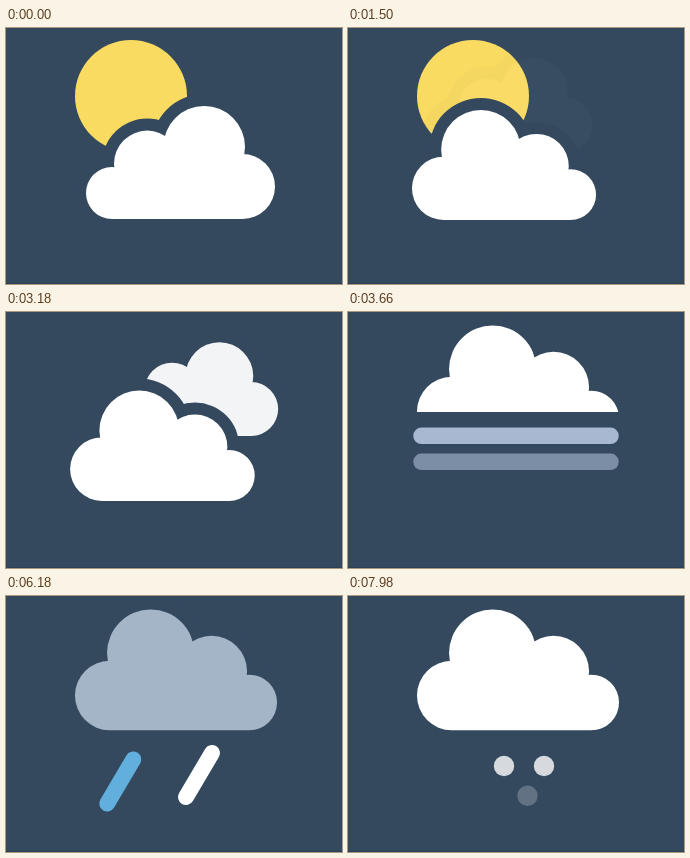
Write an HTML page with a canvas that moves like this. It is 336 px wide and 256 px high and loops after 8000 ms.

```html
<!DOCTYPE html>
<html lang="en">
<head>
<meta charset="utf-8">
<title>Weather icons</title>
<style>
html, body { margin: 0; width: 100%; height: 100%; overflow: hidden; background: #34495e; }
canvas { display: block; width: 336px; height: 256px; }
</style>
</head>
<body>
<canvas id="stage" width="336" height="256"></canvas>
<script>
const W = 336, H = 256, LOOP = 8000, TAU = Math.PI * 2;
const BG = '#34495e', SUN = '#f9db62', BLUE = '#62aedd', FOG = '#a8b8d0';
const WHITE = [255, 255, 255], GREY = [165, 181, 200];
const GAP = 12;

const stage = document.getElementById('stage').getContext('2d');
const layer = document.createElement('canvas');
layer.width = W;
layer.height = H;
const buf = layer.getContext('2d');

const clamp = v => Math.max(0, Math.min(1, v));
const lerp = (a, b, u) => a + (b - a) * u;
const mix = (a, b, u) => `rgb(${a.map((v, i) => Math.round(lerp(v, b[i], u)))})`;

// Eases from 0 to 1 between two times
function ramp(t, from, to) {
  const u = clamp((t - from) / (to - from));
  return u * u * (3 - 2 * u);
}

// Eases from 0 past 1 at the peak, then settles on 1
function swing(t, from, peak, to, over) {
  return (1 + over) * ramp(t, from, peak) - over * ramp(t, peak, to);
}

// Lobes relative to the middle of the base
const LOBES = [
  { x: -68.5, y: -26, r: 26 },
  { x: -33.3, y: -55.2, r: 33.2 },
  { x: 23.7, y: -72.2, r: 40.8 },
  { x: 62, y: -32.5, r: 32.5 }
];

function fillCloud(x, y, scale, dir, grow, color) {
  buf.beginPath();
  for (const lobe of LOBES) {
    const cx = x + lobe.x * scale * dir, cy = y + lobe.y * scale, r = lobe.r * scale + grow;
    buf.moveTo(cx + r, cy);
    buf.arc(cx, cy, r, 0, TAU);
  }
  const left = dir > 0 ? LOBES[0].x : -LOBES[3].x;
  buf.rect(x + left * scale, y - 50 * scale, 130.5 * scale, 50 * scale + grow);
  buf.fillStyle = color;
  buf.fill();
}

function cloud(x, y, scale, dir, color, alpha, cut = H) {
  if (alpha <= 0) return;
  buf.clearRect(0, 0, W, H);
  buf.save();
  buf.beginPath();
  buf.rect(0, 0, W, cut);
  buf.clip();
  fillCloud(x, y, scale, dir, GAP, BG);
  fillCloud(x, y, scale, dir, 0, color);
  buf.restore();
  stage.globalAlpha = alpha;
  stage.drawImage(layer, 0, 0);
  stage.globalAlpha = 1;
}

function disc(x, y, r, color, alpha = 1) {
  stage.globalAlpha = alpha;
  stage.fillStyle = color;
  stage.beginPath();
  stage.arc(x, y, Math.max(0, r), 0, TAU);
  stage.fill();
  stage.globalAlpha = 1;
}

function line(x1, y1, x2, y2, width, color, alpha) {
  stage.globalAlpha = alpha;
  stage.strokeStyle = color;
  stage.lineWidth = width;
  stage.lineCap = 'round';
  stage.beginPath();
  stage.moveTo(x1, y1);
  stage.lineTo(x2, y2);
  stage.stroke();
  stage.globalAlpha = 1;
}

// Swells before it shrinks away
function sun(t) {
  const u = clamp((t - 2235) / 615);
  disc(125, 68, 56 * (1 - u * u * (3.85 * u - 2.85)), SUN);
}

function nightCloud(t) {
  const out = ramp(t, 630, 810);
  cloud(174.5 - 32.4 * out, 191, 1, 1, '#fff', 1 - out);
}

function backCloud(t) {
  const shown = ramp(t, 1470, 1830) - ramp(t, 3150, 3360);
  cloud(165.5 + 30 * shown, 124, 0.83, 1, '#fff', shown);
}

function frontCloud(t) {
  if (t < 630) return;
  const move = ramp(t, 3150, 3450);
  const x = 86 + 70 * swing(t, 630, 900, 1230, 0.27) + 14 * move;
  const y = 192 - 57.7 * swing(t, 3150, 3390, 3600, 0.17);
  const scale = 0.74 + 0.234 * swing(t, 630, 900, 1230, 0.75) + 0.095 * move;
  const grey = ramp(t, 4380, 4800) - ramp(t, 7440, 7920);
  const sliced = ramp(t, 3480, 3600) - ramp(t, 4380, 4560);
  const cut = sliced > 0 ? lerp(134.3, 100, sliced) : H;
  cloud(x, y, scale, -1, mix(WHITE, GREY, grey), ramp(t, 600, 720), cut);
}

function fog(t) {
  for (let i = 0; i < 2; i++) {
    const y = 123.8 + 26 * i;
    const alpha = ramp(t, 3420 + 30 * i, 3630 + 180 * i) - ramp(t, 4380, 4590);
    line(73.5, y, 262.5, y, 16.5, FOG, clamp(alpha));
  }
}

function bolt(t) {
  const size = swing(t, 4470, 4680, 4830, 0.17);
  const fall = clamp((t - 5110) / 400);
  if (size <= 0 || fall === 1) return;
  stage.save();
  stage.translate(162, 146 + 115 * fall * fall);
  stage.scale(size, size);
  stage.fillStyle = SUN;
  stage.fill(new Path2D('M-4 0H18L5 24H24L-20 69.5L-5 36H-24Z'));
  stage.restore();
}

// Slides in, falls out, comes back once and leaves along its slant
function drop(t, x, color, first, again, last) {
  const back = again + 150;
  const enter = t < back ? ramp(t, first, first + 240) : ramp(t, back, back + 120);
  const leave = t < back ? ramp(t, again, back) : ramp(t, last, last + 360);
  const fall = 29 * leave - 13 * (1 - enter);
  const alpha = clamp(Math.min(1 + fall / 13, (29 - fall) / 16));
  const dx = x - fall * 0.577;
  line(dx, 157 + fall, dx - 26, 201 + fall, 16, color, alpha);
}

function flake(t, x, y, start) {
  disc(x, y, 10.2, '#fff', 0.8 * ramp(t, start, start + 300));
}

function draw() {
  const t = performance.now() % LOOP;
  stage.fillStyle = BG;
  stage.fillRect(0, 0, W, H);
  sun(t);
  nightCloud(t);
  backCloud(t);
  frontCloud(t);
  fog(t);
  bolt(t);
  drop(t, 131, BLUE, 5520, 6135, 7050);
  drop(t, 206, '#fff', 5670, 5910, 6630);
  flake(t, 156, 170, 7680);
  flake(t, 196, 170, 7680);
  flake(t, 179.5, 199.7, 7875);
  stage.fillStyle = '#2e3f58';
  stage.fillRect(0, H - 1, W, 1);
  requestAnimationFrame(draw);
}
draw();
</script>
</body>
</html>
```
